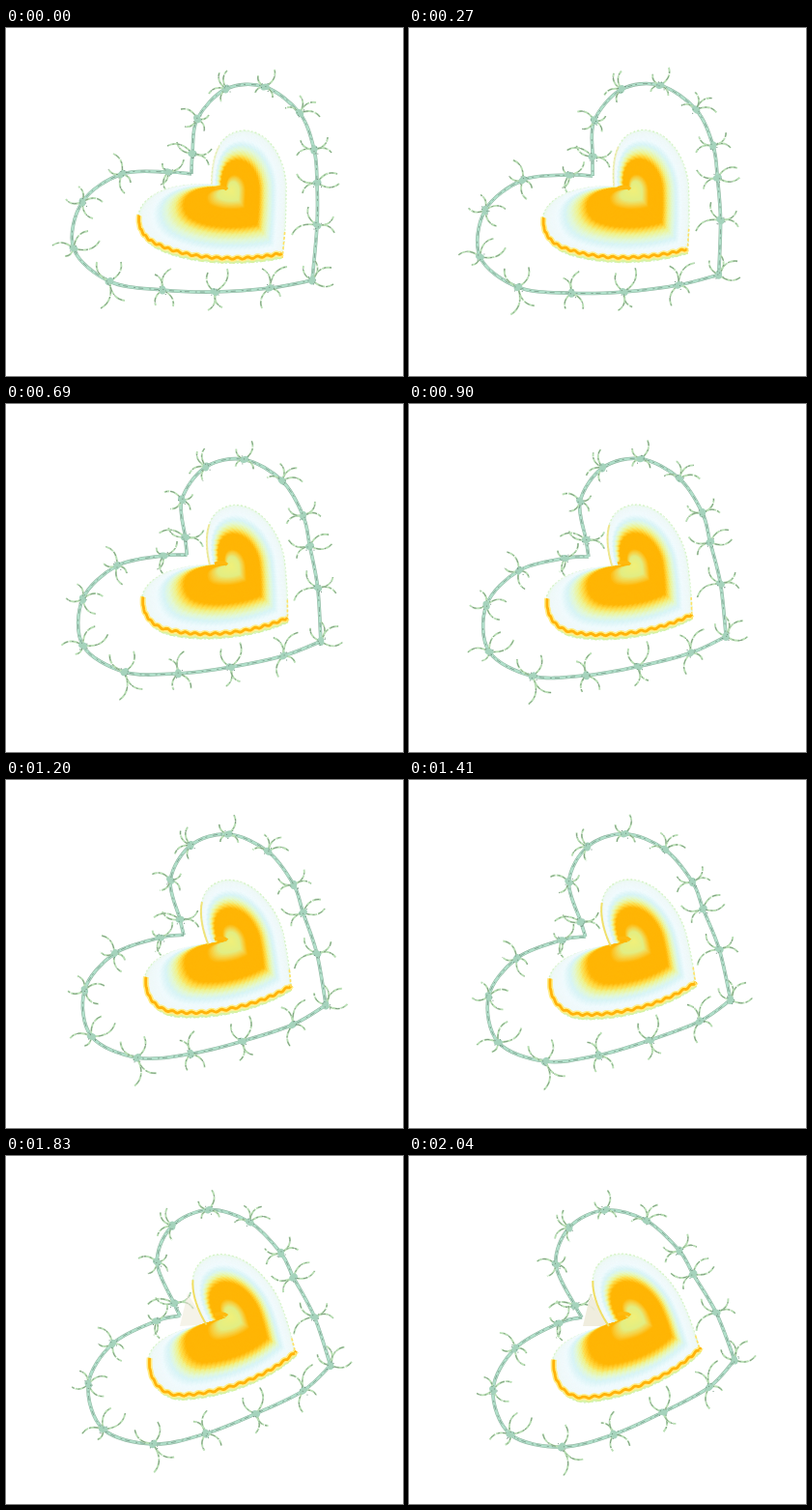
An HTML page with a canvas that plays this animation: 411 by 360 pixels, repeating every 2.07 s.

```html
<!DOCTYPE html>
<html lang="en">
<meta charset="utf-8">
<title>Heart in barbed wire</title>
<style>
html, body { margin: 0; width: 100%; height: 100%; overflow: hidden; background: #fff }
canvas { display: block }
</style>
<canvas id="c" width="411" height="360"></canvas>
<script>
const g = document.getElementById('c').getContext('2d');
const STEP = 30, STEPS = 69;

// Wire knots: start x, y and end x, y. The first is the cusp, the ninth the tip.
const KNOTS = [
  [192,151, 179,167], [193,130, 172,155], [198,94, 152,112], [228,63, 166,74],
  [268,61, 203,56], [304,88, 246,67], [319,126, 280,98], [322,160, 294,122],
  [322,204, 318,162], [317,261, 337,211], [273,269, 311,239], [216,273, 263,265],
  [162,271, 212,288], [107,262, 158,301], [70,228, 105,288], [79,180, 87,242],
  [120,151, 110,199], [168,149, 155,173]
];
const TIP = 9;

// Barb ends relative to their knot, from the second knot on.
const BARBS = [
  [-16,-12, 20,-5, 17,12, -26,-8], [-17,-10, -13,8, 12,-4, 7,13],
  [-7,-17, -18,5, 1,-19, -5,14], [10,-18, -7,-12, -10,6, 8,11],
  [17,-11, 0,-18, 21,4, -15,-5], [14,-13, 18,3, -18,6, -14,-10],
  [21,-9, 23,1, -21,-9, -15,11], [17,-9, 18,8, -26,10, -9,-19],
  [20,-13, 22,4, -9,-15, 3,-20], [-8,-20, 18,-22, -8,21, 11,9],
  [-7,-20, 13,-24, -7,19, 8,16], [-8,-16, 9,-22, -7,16, 11,17],
  [-13,-20, 12,-20, -9,28, 16,20], [-22,-3, -9,8, 27,-8, 15,-18],
  [-17,-3, -4,-16, 21,0, 11,17], [-9,-21, -14,-5, 3,20, 9,9],
  [-8,13, 16,-13, -6,-9, -3,18]
];

// Heart outline: a start point, then cubic segments from cusp round to cusp.
const HEART_A = [213,162, 213,138, 218,107, 247,106, 275,107, 290,140, 290,165,
  290,190, 289,215, 286,238, 250,246, 195,246, 160,230,
  142,222, 135,208, 137,193, 142,172, 170,160, 213,162];
const HEART_B = [207,176, 190,152, 178,112, 212,102, 245,96, 275,130, 285,155,
  292,170, 298,190, 302,203, 275,232, 225,252, 182,255,
  158,253, 147,232, 149,210, 152,195, 175,182, 207,176];

// Heart shading from the rim (1) to the middle (0).
const SHADES = [
  [1, 232,249,232], [.96, 239,248,248], [.84, 240,250,253], [.76, 216,244,246],
  [.69, 226,248,214], [.61, 238,242,142], [.56, 255,217,66], [.51, 255,181,4],
  [.27, 255,181,4], [.21, 246,210,70], [.15, 226,238,132], [0, 242,240,120]
];

const mix = (a, b, u) => a + (b - a) * u;

function shade(s) {
  const i = Math.max(1, SHADES.findIndex(k => k[0] <= s));
  const a = SHADES[i - 1], b = SHADES[i], u = (a[0] - s) / (a[0] - b[0]);
  return `rgb(${[1, 2, 3].map(k => Math.round(mix(a[k], b[k], u)))})`;
}

function stroke(path, color, width, dash = [], shift = 0) {
  g.strokeStyle = color;
  g.lineWidth = width;
  g.setLineDash(dash);
  g.lineDashOffset = shift;
  g.stroke(path);
}

// Smooth open curve through the points.
function spline(path, pts) {
  path.moveTo(...pts[0]);
  for (let i = 1; i < pts.length; i++) {
    const a = pts[i - 1], b = pts[i], p = pts[i - 2] || a, n = pts[i + 1] || b;
    path.bezierCurveTo(a[0] + (b[0] - p[0]) / 6, a[1] + (b[1] - p[1]) / 6,
      b[0] - (n[0] - a[0]) / 6, b[1] - (n[1] - a[1]) / 6, ...b);
  }
}

function drawWire(u) {
  const swell = 1 + .08 * u * (1 - u);
  const pts = KNOTS.map(k => [
    205 + (mix(k[0], k[2], u) - 205) * swell,
    165 + (mix(k[1], k[3], u) - 165) * swell]);
  const wire = new Path2D();
  spline(wire, pts.slice(0, TIP + 1));
  spline(wire, [...pts.slice(TIP), pts[0]]);
  stroke(wire, '#94b9a4', 3.6);
  stroke(wire, '#b0dfca', 2.5);
  stroke(wire, '#6f8f7d', .7, [5, 3, 2, 6], u * 30);

  const turn = -.38 * u, c = Math.cos(turn), s = Math.sin(turn);
  BARBS.forEach((ends, i) => {
    const [x, y] = pts[i + 1];
    for (let j = 0; j < 8; j += 2) {
      const dx = ends[j] * c - ends[j + 1] * s, dy = ends[j] * s + ends[j + 1] * c;
      const bend = (j % 4 ? -.38 : .38) * (i % 2 ? 1 : -1);
      const barb = new Path2D();
      barb.moveTo(x, y);
      barb.quadraticCurveTo(x + dx * .6 - dy * bend, y + dy * .6 + dx * bend, x + dx, y + dy);
      stroke(barb, '#b9dfb4', 1.9, [15, 1, 40]);
      stroke(barb, '#66806a', .7, [2, 4, 5, 3], i * 3 + j + u * 20);
    }
    g.fillStyle = '#a5d3bc';
    g.beginPath();
    g.ellipse(x, y, 4.6, 3.4, i + turn, 0, 7);
    g.fill();
    g.fillStyle = '#71917f';
    for (let k = 0; k < 5; k++)
      g.fillRect(x + 4 * Math.sin(i * 5 + k * 2.3 + u * 9), y + 4 * Math.cos(i + k * 1.7), 1, 1);
  });
}

function outline(q) {
  const path = new Path2D();
  path.moveTo(q[0], q[1]);
  for (let i = 2; i < q.length; i += 6) path.bezierCurveTo(...q.slice(i, i + 6));
  return path;
}

function cubic(q, i, t) {
  const v = 1 - t;
  return [0, 1].map(k => v * v * v * q[i + k] + 3 * v * v * t * q[i + 2 + k] +
    3 * v * t * t * q[i + 4 + k] + t * t * t * q[i + 6 + k]);
}

// Wavy trim along the lower edge, from the tip to the left side.
function trim(q, lift, wave) {
  const path = new Path2D();
  for (let n = 0; n <= 120; n++) {
    const part = n < 84 ? 18 : 24;
    const [x, y] = cubic(q, part, n < 84 ? n / 84 : (n - 84) / 36);
    const rise = n < 84 ? lift : lift * (1 - (n - 84) / 36);
    path.lineTo(x + (n > 84 ? (n - 84) / 36 : 0), y - rise + wave * Math.sin(n * .95));
  }
  return path;
}

function drawHeart(u) {
  const q = HEART_A.map((a, i) => mix(a, HEART_B[i], u));
  const cx = 233, cy = mix(168, 166, u), grow = mix(1, 1.1, u);

  if (u > .7) {
    g.fillStyle = `rgba(238,235,218,${(u - .7) * 3})`;
    g.beginPath();
    g.moveTo(188, 142);
    g.lineTo(180, 176);
    g.lineTo(q[0], q[1]);
    g.fill();
  }
  const body = outline(q);
  g.fillStyle = shade(1);
  g.fill(body);
  stroke(body, '#d5f3c6', 1.5, [2, 2]);

  for (let s = .985; s > .02; s -= .015) {
    const ring = outline(q.map((v, i) => i % 2 ? cy + (v - cy) * s : cx + (v - cx) * s));
    const color = shade(Math.min(1, s > .75 ? s : s / mix(1, grow, Math.min(1, (.75 - s) * 8))));
    g.fillStyle = color;
    g.fill(ring);
    if (s > .45) stroke(ring, color, 1.6, [2, 3]);
  }

  // Small curl at the middle notch
  const curl = new Path2D();
  curl.moveTo(cx - 17, cy - 2);
  curl.quadraticCurveTo(cx - 8, cy - 5, cx - 4, cy - 1);
  stroke(curl, '#ffb90e', 3.5);

  stroke(trim(q, 1, .6), '#d8f2a0', 2);
  stroke(trim(q, 5, .8), '#ffed86', 6);
  stroke(trim(q, 5, 1), '#ffb30a', 2.8);

  const side = new Path2D();
  side.moveTo(...cubic(q, 12, .62));
  side.lineTo(q[18], q[19]);
  stroke(side, '#ffe066', 1.6, [3, 2]);

  const fold = new Path2D();
  for (let n = 0; n <= 10; n++) fold.lineTo(...cubic(q, 0, n / 18));
  stroke(fold, `rgba(240,222,100,${Math.min(1, .25 + u)})`, 2);
}

function draw(now) {
  const u = Math.floor(now / STEP) % STEPS / (STEPS - 1);
  g.fillStyle = '#fff';
  g.fillRect(0, 0, 411, 360);
  g.lineCap = 'butt';
  g.lineJoin = 'round';
  drawWire(u);
  drawHeart(u);
}

const start = performance.now();
function loop() {
  draw(performance.now() - start);
  requestAnimationFrame(loop);
}
loop();
</script>
</html>
```
